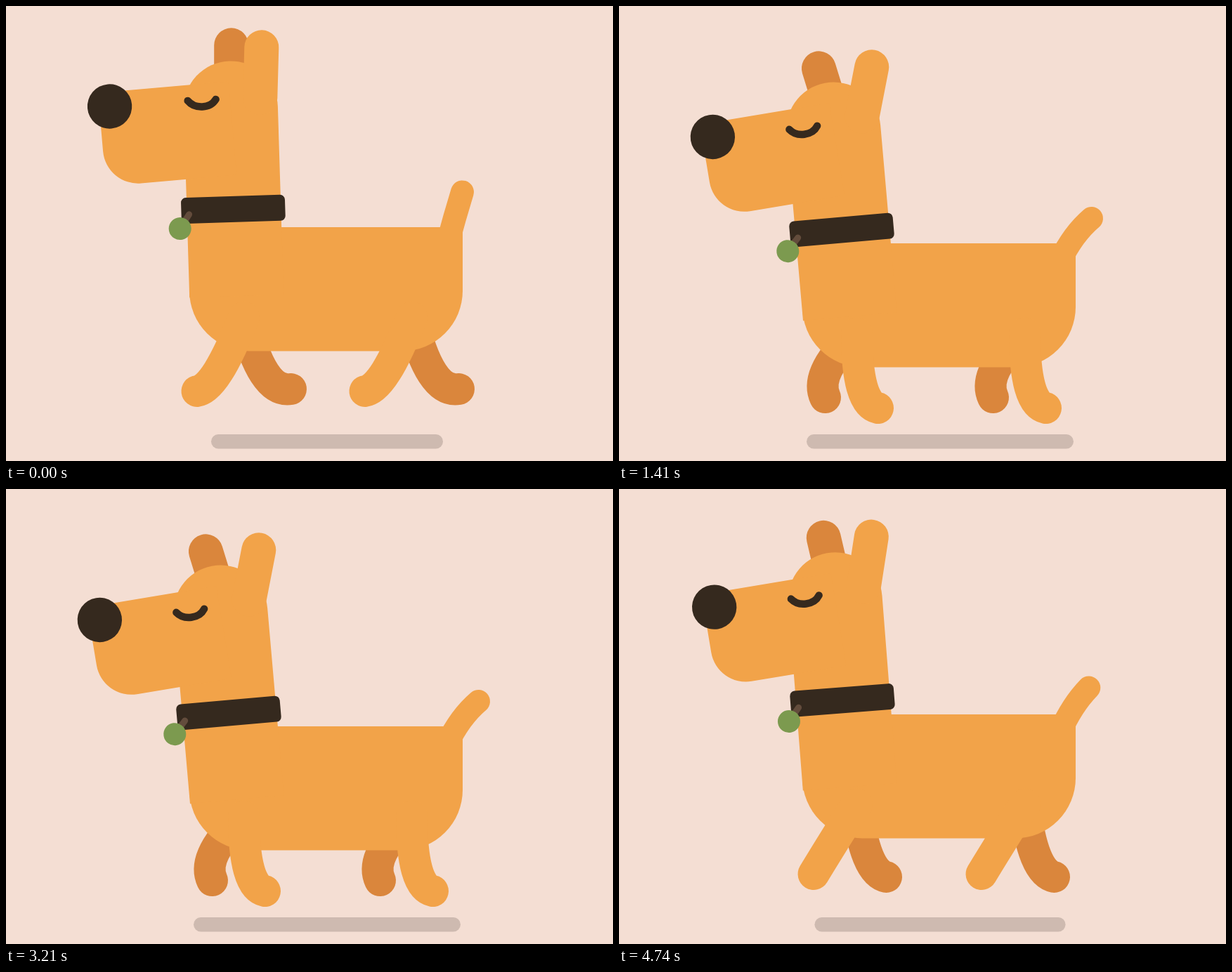
Write an HTML page with a canvas that moves like this. It is 864 px wide and 648 px high and loops after 4.77 s.

```html
<!DOCTYPE html>
<html lang="en">
<head>
<meta charset="utf-8">
<title>Walking dog</title>
<style>
  html, body { margin: 0; width: 100%; height: 100%; overflow: hidden; background: #f4ded3; }
  canvas { display: block; }
</style>
</head>
<body>
<canvas id="stage" width="864" height="648"></canvas>
<script>
const ctx = document.getElementById('stage').getContext('2d');
const LOOP = 4770, STEP = 30, STRIDE = 600, BOB = 300;
const COAT = '#f2a349', SHADE = '#da863c', DARK = '#35291e';
const mod = (a, n) => ((a % n) + n) % n;

// 0 -> 1 -> 0 over one bob, optionally delayed
const wave = t => 1 - Math.abs(mod(t, BOB) / (BOB / 2) - 1);
const swing = (t, delay = 0) => { const v = wave(t - delay); return v * v * (3 - 2 * v); };
const bounce = t => { const v = wave(t); return v < .5 ? 8 * v ** 4 : 1 - 8 * (1 - v) ** 4; };

// Leg poses: time, foot x, foot y, bend x, bend y (y measured from the back)
const GAIT = [
  [0, 272, 233.5, 299, 230],
  [105, 318, 236, 327, 200],
  [210, 368.5, 234.5, 338.5, 228],
  [240, 380.5, 231.5, 349.7, 225],
  [300, 405.5, 230.5, 364, 237],
  [405, 350, 208, 315, 198],
  [510, 293.5, 219.5, 277, 184],
  [540, 277, 227.5, 293, 201]
];

function key(i) {
  const n = GAIT.length, k = GAIT[mod(i, n)];
  return [k[0] + STRIDE * Math.floor(i / n), ...k.slice(1)];
}

function gait(time) {
  const t = mod(time, STRIDE);
  let i = GAIT.length - 1;
  while (GAIT[i][0] > t) i--;
  const [a, b, c, d] = [key(i - 1), key(i), key(i + 1), key(i + 2)];
  const h = c[0] - b[0], u = (t - b[0]) / h;
  return [1, 2, 3, 4].map(j => {
    const m0 = (c[j] - a[j]) / (c[0] - a[0]) * h, m1 = (d[j] - b[j]) / (d[0] - b[0]) * h;
    const u2 = u * u, u3 = u2 * u;
    return b[j] * (2 * u3 - 3 * u2 + 1) + m0 * (u3 - 2 * u2 + u)
      + c[j] * (3 * u2 - 2 * u3) + m1 * (u3 - u2);
  });
}

function group(x, y, degrees, draw) {
  ctx.save();
  ctx.translate(x, y);
  ctx.rotate(degrees * Math.PI / 180);
  draw();
  ctx.restore();
}

function box(x, y, w, h, radii, color) {
  ctx.fillStyle = color;
  ctx.beginPath();
  ctx.roundRect(x, y, w, h, radii);
  ctx.fill();
}

function disc(x, y, r, color) {
  ctx.fillStyle = color;
  ctx.beginPath();
  ctx.arc(x, y, r, 0, 7);
  ctx.fill();
}

function limb(x0, y0, cx, cy, x1, y1, width, color) {
  ctx.strokeStyle = color;
  ctx.lineWidth = width;
  ctx.beginPath();
  ctx.moveTo(x0, y0);
  ctx.quadraticCurveTo(cx, cy, x1, y1);
  ctx.stroke();
}

function legs(t, color) {
  const [fx, fy, cx, cy] = gait(t);
  for (const dx of [0, 239]) limb(338.5 + dx, 128, cx + dx, cy, fx + dx, fy, 45, color);
}

function ear(x, y, length, degrees, color) {
  group(x, y, degrees, () => limb(0, 0, 0, -length / 2, 0, -length, 49, color));
}

function eye(t) {
  const s = swing(t, 60);
  ctx.strokeStyle = DARK;
  ctx.lineWidth = 10.5;
  ctx.beginPath();
  ctx.translate(-59 - 3.2 * s, -19 + 9 * s);
  ctx.moveTo(0, 0);
  ctx.bezierCurveTo(9, 13, 31, 14, 40, 1.5);
  ctx.stroke();
}

function draw(t) {
  const neckTilt = -5 * swing(t, 60), headTilt = -5 * swing(t, 90);
  const inNeck = part => group(436, 91, neckTilt, part);
  const inHead = part => inNeck(() => group(-108, -264, headTilt, part));

  ctx.fillStyle = '#f4ded3';
  ctx.fillRect(0, 0, 864, 648);
  ctx.lineCap = 'round';

  const shadow = 330 + 77 * swing(t);
  box(457 - shadow / 2, 610, shadow, 20.5, 10.2, '#cebab0');

  group(0, 315 + 29 * bounce(t), 0, () => {
    legs(t + STRIDE / 2, SHADE);
    inHead(() => ear(2.6, -21.5, 68, 6.7 - 16 * swing(t, 30), SHADE));

    const wag = swing(t, 60);
    limb(628, 25, 634.5 + 11.5 * wag, -15 + 2 * wag, 637 + 35.5 * wag, -58 + 22.4 * wag, 33, COAT);
    box(261, 0, 389, 176.5, [0, 0, 86, 86], COAT);
    legs(t, COAT);

    inNeck(() => box(-175, -331, 134, 335, [67, 67, 0, 0], COAT));
    inHead(() => {
      box(-186.5, -38, 186.5, 133.5, [0, 0, 0, 50], COAT);
      disc(-171.5, -17.5, 31.7, DARK);
      ear(43, -11, 72, -1 + 21.5 * swing(t, 60), COAT);
      eye(t);
    });
    inNeck(() => {
      box(-183, -138.5, 148, 37, 7, DARK);
      group(-172, -114.5, 34 + 10 * swing(t, 15), () => {
        limb(0, 0, 0, 8, 0, 16, 9, '#634c3c');
        disc(0, 24, 16, '#7c9a4f');
      });
    });
  });
}

function frame() {
  const t = performance.now() % LOOP;
  draw(Math.floor(t / STEP) * STEP);
  requestAnimationFrame(frame);
}
frame();
</script>
</body>
</html>
```
